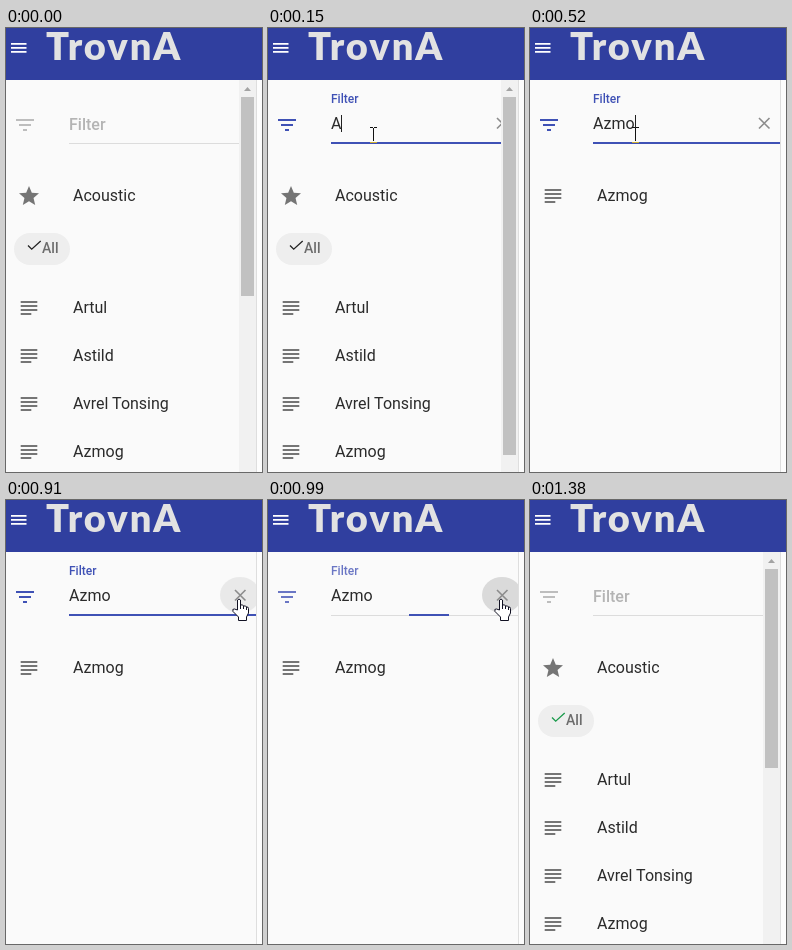
Animation, 256 px wide and 444 px high, one loop 1.54 s. Source, as an HTML page:

```html
<!DOCTYPE html>
<html lang="en">
<head>
<meta charset="utf-8">
<title>Filter list</title>
<style>
  html, body { margin: 0; width: 100%; height: 100%; overflow: hidden; background: #fafafa; }
  svg { display: block; width: 256px; height: 444px; }
  text { font: 16px Roboto, sans-serif; fill: #2b2b2b; }
  #title { font: 900 38px Lato, sans-serif; letter-spacing: 2px; fill: #e2e2e2; }
  #chip { font-size: 14px; font-weight: 500; fill: #6c6c6c; }
  .icon { fill: #757575; }
</style>
</head>
<body>
<svg viewBox="0 0 256 444">
  <defs>
    <path id="lines" class="icon" d="M3.700 5h16.600v2H3.700zM3.700 9h16.600v2H3.700zM3.700 13h16.600v2H3.700zM3.700 17h10.600v2H3.700z"/>
  </defs>
  <rect width="256" height="444" fill="#fafafa"/>

  <path id="funnel" transform="translate(7 85)" d="M3 6h18v2H3zM6 11h12v2H6zM10 16h4v2h-4z"/>
  <text id="label">Filter</text>
  <text id="typed" x="63" y="101"></text>
  <path d="M63 115h187v1H63z" fill="#dcdcdc"/>
  <rect id="focus" y="114" height="2" fill="#3f51b5"/>
  <ellipse id="hover" cx="234" cy="95" rx="20" ry="18" fill="#dadada"/>
  <path id="clear" d="M229 90l10.500 10.500M239.500 90L229 100.500" stroke="#8c8c8c" stroke-width="1.600"/>
  <rect id="caret" y="87" width="1" height="17" fill="#212121"/>

  <g id="list">
    <path class="icon" transform="translate(11 156)" d="M12 17.270L18.180 21l-1.640-7.030L22 9.240l-7.190-.61L12 2 9.190 8.630 2 9.240l5.460 4.730L5.820 21z"/>
    <text x="67" y="173">Acoustic</text>
    <rect x="8" y="205" width="56" height="32" rx="16" fill="#eee"/>
    <path id="check" d="M22 217.500l3.700 3.700 9-8.200" fill="none" stroke-width="1.300"/>
    <text id="chip" x="36" y="225">All</text>
    <g id="rows"></g>
    <rect x="233" y="52" width="17" height="392" fill="#f1f1f1"/>
    <rect id="thumb" x="235" y="69" width="13" fill="#c1c1c1"/>
    <path d="M238 63l3.500-4 3.500 4z" fill="#a3a3a3"/>
  </g>
  <g id="match">
    <use href="#lines" x="11" y="156"/>
    <text x="67" y="173">Azmog</text>
  </g>

  <rect x="250" y="52" width="6" height="392" fill="#fdfdfd"/>
  <rect x="250" y="52" width="1" height="392" fill="#dedede"/>
  <rect width="256" height="52" fill="#303f9f"/>
  <path d="M5 15h15.500v1.800H5zM5 19h15.500v1.800H5zM5 23h15.500v1.800H5z" fill="#fff"/>
  <text id="title" x="40" y="31.500">TrovnA</text>

  <g id="beam">
    <path d="M-3.500 .5h3M.5 .5h3M0 1v13" fill="none" stroke="#111"/>
    <path d="M-3.500 15.500h7" stroke="#d0b030"/>
  </g>
  <g id="hand" transform="translate(226 98)" stroke="#112" fill="#fff">
    <path d="M5.500 12V2q1.500-2 3 0V7q2.500-.8 3 1 2.500-.6 3 1 2-.3 2 1.500V15l-2 4v3.500h-8V19L1 13.500q-1-3 1.500-2.500z"/>
    <path d="M8.500 7v4M11.500 8v3M14.500 9v3" fill="none"/>
  </g>
  <path id="arrow" transform="translate(216 366)" d="M.5 .5v16l3.700-3.500 2.500 5.600 2.400-1-2.500-5.500h5.200z" fill="#fff" stroke="#112"/>
</svg>
<script>
const LOOP = 1540, CUTS = [70, 150, 520, 750, 830, 910, 990, 1300, 1380];
const INDIGO = "#3f51b5", FADED = "#6a76c4";
const $ = id => document.getElementById(id);
const set = (id, attrs) => { for (const k in attrs) $(id).setAttribute(k, attrs[k]); };
const show = (id, on) => set(id, { visibility: on ? "visible" : "hidden" });

$("rows").innerHTML = ["Artul", "Astild", "Avrel Tonsing", "Azmog"].map((name, i) =>
  `<use href="#lines" x="11" y="${268 + 48 * i}"/><text x="67" y="${285 + 48 * i}">${name}</text>`).join("");

function draw() {
  const t = performance.now() % LOOP;
  const step = CUTS.filter(c => c <= t).length;
  const idle = step === 0 || step === 9;
  const full = step < 3 || step === 9;
  const blurred = step === 7 || step === 8;

  show("list", full);
  show("match", !full);
  set("check", { stroke: step === 9 ? "#189a4a" : "#222" });
  // Filtering shortens the list, so the scroll thumb grows.
  set("thumb", { height: step === 2 ? 358 : 199 });

  // The label floats up and shrinks as the field takes focus.
  const lift = idle ? 0 : step === 1 ? .55 : 1;
  const tint = blurred ? FADED : INDIGO;
  set("label", { transform: `translate(63 ${102 - 27 * lift}) scale(${1 - lift / 4})` });
  $("label").style.cssText = `fill:${idle ? "#b4b4b4" : tint};font-weight:500`;
  set("funnel", { fill: idle ? "#bdbdbd" : tint });

  const half = idle ? 0 : blurred ? 20 : step === 1 ? 60 : 98;
  set("focus", { x: 161 - half, width: 2 * half });

  $("typed").textContent = idle || step === 1 ? "" : step === 2 ? "A" : "Azmo";
  show("caret", step === 2 || step === 3);
  set("caret", { x: step === 2 ? 73 : 105 });
  show("clear", step > 1 && step < 9);
  show("hover", step > 5 && step < 9);
  set("hover", { opacity: step === 6 ? .5 : 1 });

  show("beam", step > 0 && step < 6);
  set("beam", { transform: `translate(${step === 5 ? 178.5 : 105.5} 99)` });
  show("hand", step === 6 || step === 7);
  show("arrow", step === 8);
  requestAnimationFrame(draw);
}
draw();
</script>
</body>
</html>
```
